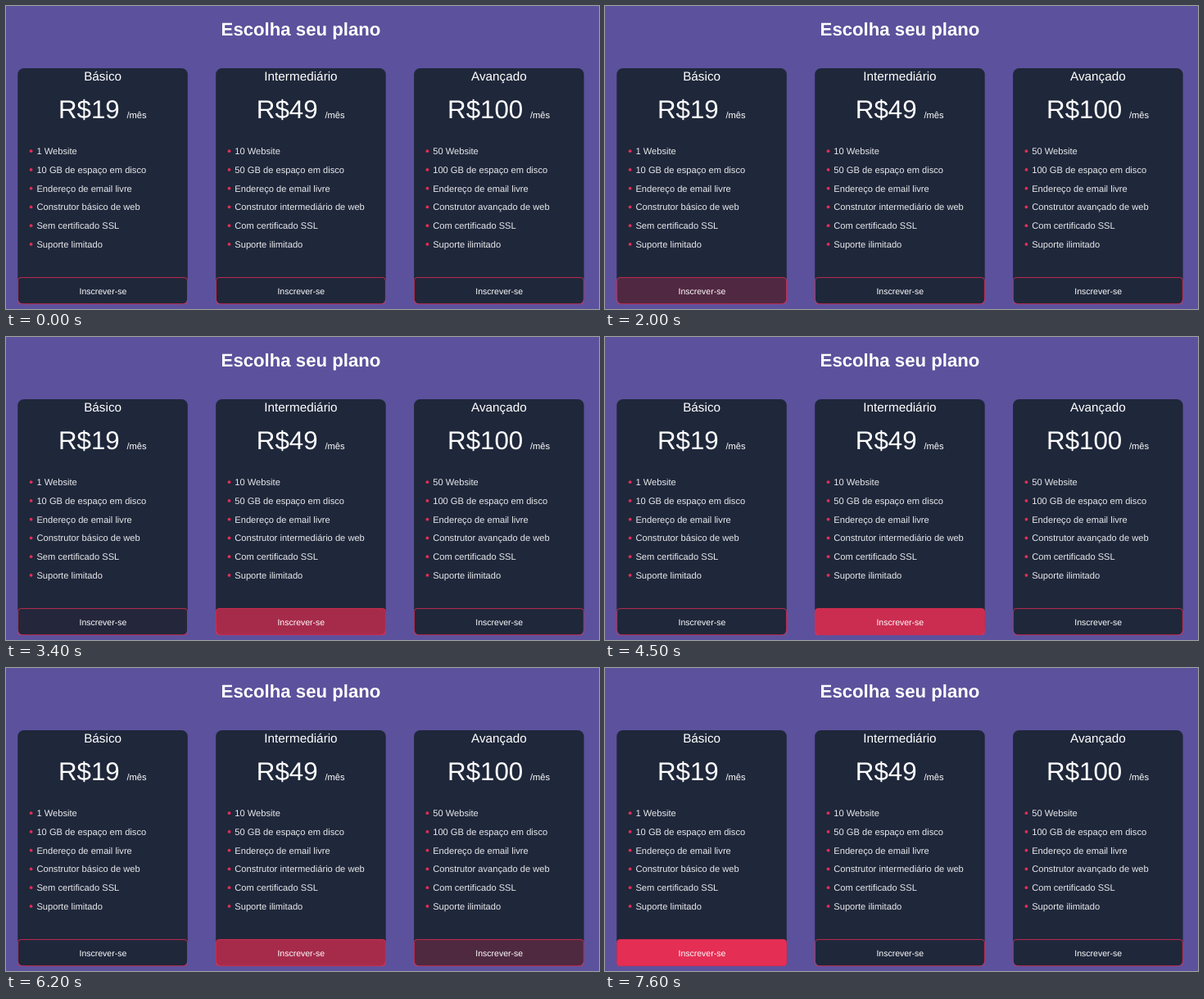
These frames come from a looping animation (724x370 px, 8 s). An HTML page:

```html
<!DOCTYPE html>
<html lang="pt">
<head>
<meta charset="utf-8">
<title>Escolha seu plano</title>
<style>
  html, body { margin: 0; width: 100%; height: 100%; overflow: hidden; background: #5c519c; }
  svg { display: block; font-family: "Liberation Sans", Arial, sans-serif; fill: #fff; }
  text { text-rendering: geometricPrecision; }
  .heading { font-size: 22.2px; font-weight: bold; }
  .name { font-size: 15.3px; }
  .price { font-size: 31.3px; }
  .period, .item { font-size: 11.15px; }
  .item { fill: #e8e9ec; }
  .label { font-size: 10.5px; }
  .middle { text-anchor: middle; }
  .card { fill: #1f273a; }
  .dot { fill: #e22e54; }
  .button { fill: #e52e54; stroke: #e52e54; stroke-width: 0.8; fill-opacity: 0; }
</style>
</head>
<body>
<svg id="stage" width="724" height="370" viewBox="0 0 724 370">
  <text class="heading middle" x="360" y="36">Escolha seu plano</text>
</svg>
<script>
const LOOP = 8000, STEP = 100, FADE = 500;
const stage = document.getElementById("stage");

// Each toggle is the moment the pointer enters or leaves the button, in turn.
const plans = [
  { x: 14.3, name: "Básico", price: 19, toggles: [1910, 3000, 7090],
    items: ["1 Website", "10 GB de espaço em disco", "Endereço de email livre",
      "Construtor básico de web", "Sem certificado SSL", "Suporte limitado"] },
  { x: 256.2, name: "Intermediário", price: 49, toggles: [3200, 4440, 6000, 7050],
    items: ["10 Website", "50 GB de espaço em disco", "Endereço de email livre",
      "Construtor intermediário de web", "Com certificado SSL", "Suporte ilimitado"] },
  { x: 498.1, name: "Avançado", price: 100, toggles: [4590, 5970],
    items: ["50 Website", "100 GB de espaço em disco", "Endereço de email livre",
      "Construtor avançado de web", "Com certificado SSL", "Suporte ilimitado"] }
];

function add(tag, attrs, text = "", parent = stage) {
  const node = document.createElementNS("http://www.w3.org/2000/svg", tag);
  for (const key in attrs) node.setAttribute(key, attrs[key]);
  node.textContent = text;
  return parent.appendChild(node);
}

function hoverFrames(toggles) {
  const frames = [{ offset: 0, fillOpacity: 0 }];
  toggles.forEach((time, i) => {
    const before = i % 2;
    frames.push(
      { offset: time / LOOP, fillOpacity: before, easing: "ease" },
      { offset: (time + FADE) / LOOP, fillOpacity: 1 - before });
  });
  frames.push({ offset: 1, fillOpacity: toggles.length % 2 });
  return frames;
}

function drawPlan({ x, name, price, items, toggles }) {
  const center = x + 103.8;
  add("rect", { class: "card", x, y: 76, width: 207.5, height: 288, rx: 7.5 });
  add("text", { class: "name middle", x: center, y: 90.7 }, name);

  const line = add("text", { class: "price middle", x: center - 0.3, y: 136.5 }, `R$${price} `);
  add("tspan", { class: "period" }, "/mês", line);

  items.forEach((item, i) => {
    const y = 177 + i * 22.75;
    add("circle", { class: "dot", cx: x + 16.3, cy: y + 0.2, r: 1.9 });
    add("text", { class: "item", x: x + 23.1, y: y + 4 }, item);
  });

  const button = add("rect", { class: "button",
    x: x + 0.3, y: 331.6, width: 206.9, height: 32.1, rx: 3.5 });
  add("text", { class: "label middle", x: center + 0.3, y: 352.3 }, "Inscrever-se");

  const hover = button.animate(hoverFrames(toggles), { duration: LOOP, fill: "both" });
  hover.pause();
  return hover;
}

const hovers = plans.map(drawPlan);
const start = performance.now();

function tick() {
  const time = (performance.now() - start) % LOOP;
  const held = Math.floor(time / STEP) * STEP;
  for (const hover of hovers) hover.currentTime = held;
  requestAnimationFrame(tick);
}
tick();
</script>
</body>
</html>
```
